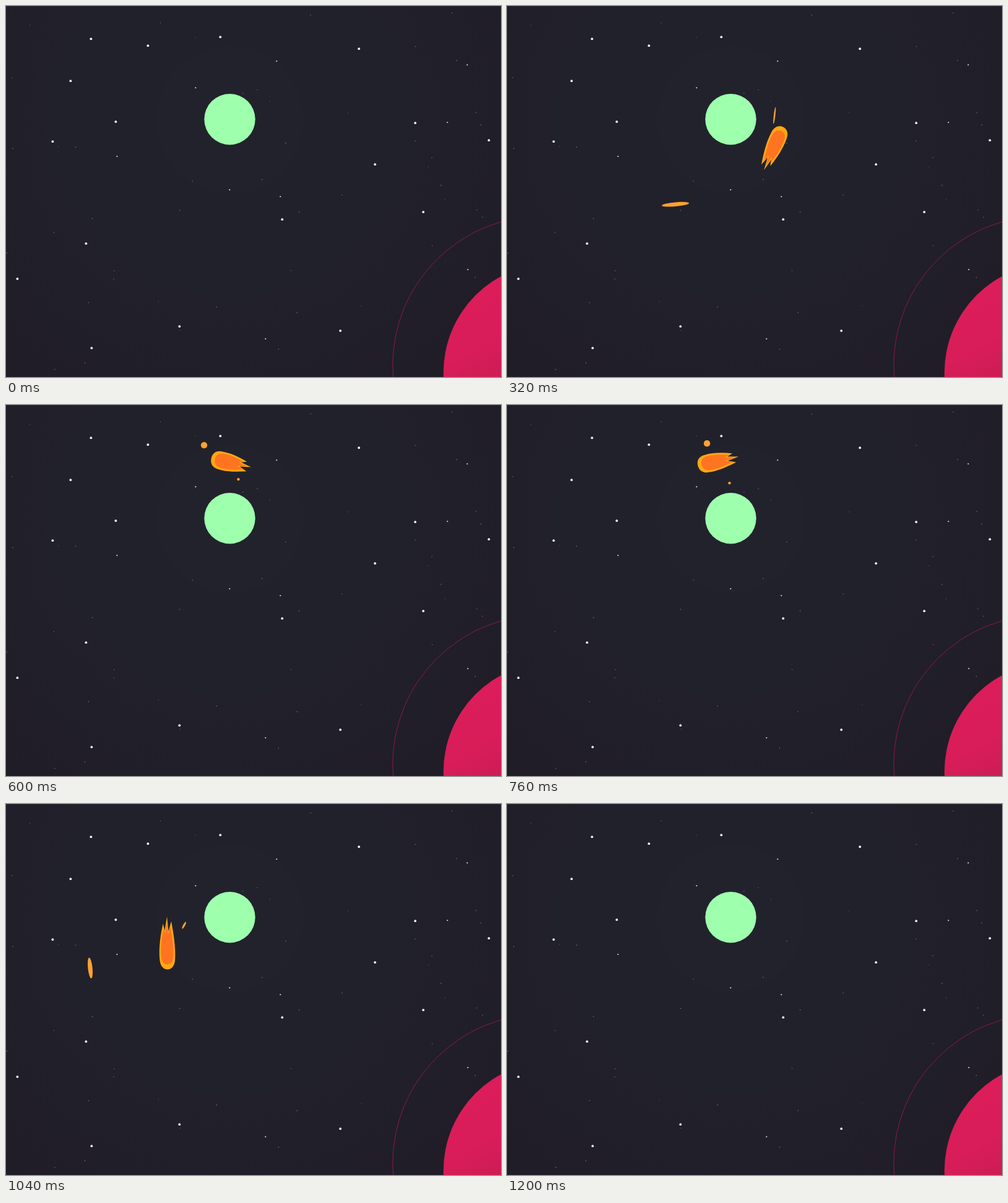
An HTML page with a canvas that plays this animation: 800 by 600 pixels, repeating every 1680 ms.

```html
<!DOCTYPE html>
<html lang="en">
<head>
<meta charset="utf-8">
<title>Comet orbit</title>
<style>
html, body { margin: 0; height: 100%; overflow: hidden; background: #201e29; }
canvas { display: block; }
</style>
</head>
<body>
<canvas id="stage" width="800" height="600"></canvas>
<script>
const ctx = document.getElementById('stage').getContext('2d');
const LOOP = 1680, STEP = 40, START = 240, END = 1200;
const RAD = Math.PI / 180;
const planet = { x: 361.6, y: 183.2, r: 41.2 };

// Orbits around the planet: step, angle in degrees, radius
const cometOrbit = [[0, 105, 200], [1, 62, 112], [2, 31, 83], [6, -70, 87], [13, -105, 95],
  [17, -140, 93], [20, -205, 112], [22, -295, 229], [23, -335, 559]];
const outerOrbit = [[1, 150, 340], [2, 123, 164], [3, 45, 105], [6, -89, 120], [13, -107.6, 127],
  [17, -118, 115], [20, -200, 240], [22, -302, 309], [23, -335, 720]];
const innerOrbit = [[1, 110, 30], [2, -5, 71], [3, -38, 68], [6, -65, 68], [13, -92, 57],
  [17, -116, 38], [20, -190, 75], [22, -284.7, 215], [23, -328, 490]];

// Comet facing +x, tip at the origin: a start point, then curves (6) and lines (2)
const flame = [[0, 0], [0, 8, -5, 14, -15, 14], [-28, 15, -45, 12, -60, 7], [-51, 4], [-69, 0],
  [-50, -3], [-63, -8], [-48, -12, -30, -16, -15, -14.5], [-5, -14, 0, -8, 0, 0]];

const brightStars = [137,53, 229,64, 346,50, 570,69, 104,121, 177,187, 75,219, 661,189, 780,217,
  596,256, 674,333, 446,345, 129,384, 18,441, 280,518, 540,525, 138,553];
const paleStars = [306,132, 437,89, 745,95, 713,188, 179,243, 361,297, 443,308, 746,426, 419,538];

// Smooth (Hermite) interpolation through unevenly spaced keys
function sample(keys, s) {
  const last = keys.length - 1;
  let i = 0;
  while (i < last - 1 && keys[i + 1][0] <= s) i++;
  const a = keys[i], b = keys[i + 1], span = b[0] - a[0];
  const before = keys[Math.max(0, i - 1)], after = keys[Math.min(last, i + 2)];
  const u = (s - a[0]) / span, u2 = u * u, u3 = u2 * u;
  return [1, 2].map(c => {
    const m0 = (b[c] - before[c]) / (b[0] - before[0]) * span;
    const m1 = (after[c] - a[c]) / (after[0] - a[0]) * span;
    return a[c] * (2 * u3 - 3 * u2 + 1) + m0 * (u3 - 2 * u2 + u)
      + b[c] * (3 * u2 - 2 * u3) + m1 * (u3 - u2);
  });
}

function position(orbit, s) {
  const [deg, r] = sample(orbit, s);
  return [planet.x + r * Math.cos(deg * RAD), planet.y + r * Math.sin(deg * RAD)];
}

// Place on the orbit, with heading and speed (pixels per step) taken from the path
function motion(orbit, s) {
  const h = .01, [x, y] = position(orbit, s);
  const [x0, y0] = position(orbit, s - h), [x1, y1] = position(orbit, s + h);
  const dx = x1 - x0, dy = y1 - y0;
  return { x, y, heading: Math.atan2(dy, dx), speed: Math.hypot(dx, dy) / (2 * h) };
}

function disc(x, y, r, fill) {
  ctx.fillStyle = fill;
  ctx.beginPath();
  ctx.arc(x, y, r, 0, 7);
  ctx.fill();
}

function drawStars() {
  let seed = 11;
  const random = () => (seed = seed * 16807 % 2147483647) / 2147483647;
  for (let i = 0; i < 55; i++)
    disc(random() * 800, random() * 600, .7, i % 4 ? '#85858d' : '#55545f');
  const place = (list, r, fill) => {
    for (let i = 0; i < list.length; i += 2) disc(list[i] + .4, list[i + 1] + .2, r, fill);
  };
  place(paleStars, 1.05, '#e6e6e8');
  place(brightStars, 1.9, '#f4f4f4');
}

function drawSky() {
  const sky = ctx.createRadialGradient(362, 184, 290, 362, 184, 620);
  sky.addColorStop(0, '#21202b');
  sky.addColorStop(1, '#201c26');
  ctx.fillStyle = sky;
  ctx.fillRect(0, 0, 800, 600);
  disc(362, 184, 290, '#21212c');
  disc(362, 184, 120, '#22222d');
  ctx.fillStyle = '#292a36';
  ctx.fillRect(0, 0, 800, 1);
  drawStars();

  disc(planet.x, planet.y, planet.r, '#9effad');
  const red = ctx.createLinearGradient(730, 470, 800, 600);
  red.addColorStop(0, '#dc1d5a');
  red.addColorStop(.6, '#d81d59');
  red.addColorStop(1, '#cd1c54');
  disc(884, 593, 177, red);
  ctx.strokeStyle = '#8d1946';
  ctx.lineWidth = 1;
  ctx.beginPath();
  ctx.arc(866, 581, 241, 0, 7);
  ctx.stroke();
}

// Speed stretches the flame, thins it and bends it around the orbit
function drawFlame(stretch, scale, inset, fill) {
  const width = stretch ** -.6, bend = .0017 * (stretch - 1);
  const place = p => {
    const out = [];
    for (let i = 0; i < p.length; i += 2) {
      const x = (p[i] * scale - inset + 30) * stretch;
      out.push(x, p[i + 1] * scale * width - bend * x * x);
    }
    return out;
  };
  ctx.fillStyle = fill;
  ctx.beginPath();
  flame.forEach((p, i) => {
    const q = place(p);
    if (!i) ctx.moveTo(...q);
    else if (q.length === 2) ctx.lineTo(...q);
    else ctx.bezierCurveTo(...q);
  });
  ctx.fill();
}

function drawComet(s) {
  const { x, y, heading, speed } = motion(cometOrbit, s);
  const stretch = .93 + .0046 * speed;
  ctx.save();
  ctx.translate(x, y);
  ctx.rotate(heading);
  drawFlame(stretch, 1, 0, '#ffa712');
  drawFlame(stretch, .79, 6.5, '#ff7420');
  ctx.restore();
}

function drawSpark(orbit, r, gain, s) {
  if (s < orbit[0][0]) return;
  const { x, y, heading, speed } = motion(orbit, s);
  const long = r + gain * speed * speed;
  ctx.fillStyle = '#ffa22f';
  ctx.beginPath();
  ctx.ellipse(x, y, long, r * (r / long) ** .3, heading, 0, 7);
  ctx.fill();
}

function frame() {
  const t = performance.now() % LOOP;
  drawSky();
  if (t >= START && t < END) {
    const s = Math.floor((t - START) / STEP);
    drawSpark(outerOrbit, 5.2, .00046, s);
    drawSpark(innerOrbit, 2.2, .0013, s);
    drawComet(s);
  }
  requestAnimationFrame(frame);
}
frame();
</script>
</body>
</html>
```
